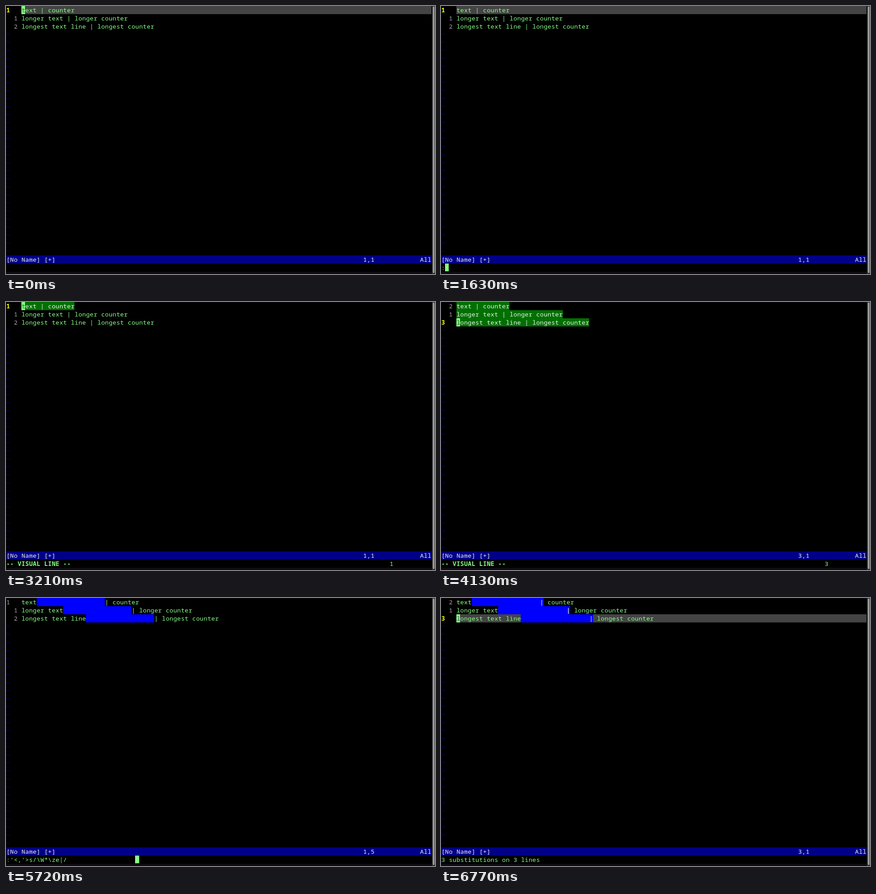
Animation, 947 px wide and 592 px high, one loop 8 s. Source, as an HTML page with a canvas:

```html
<!DOCTYPE html>
<html lang="en">
<head>
<meta charset="utf-8">
<style>
  html, body { margin: 0; width: 100%; height: 100%; overflow: hidden; background: #000; }
  canvas { display: block; }
</style>
</head>
<body>
<canvas id="stage" width="947" height="592"></canvas>
<script>
const ctx = document.getElementById('stage').getContext('2d');
const LOOP = 8000, COLS = 112, GUTTER = 4, STATUS = 31, COMMAND = 32;
const GREEN = '#87ff87', WHITE = '#f0f0f0', GRAY = '#a8a8a8', YELLOW = '#ffff00';
const CURSOR_LINE = '#444444', VISUAL = '#007000', MATCH = '#0000ff', NAVY = '#000087';

const pairs = [['text', 'counter'], ['longer text', 'longer counter'],
               ['longest text line', 'longest counter']];
const gap = ' '.repeat(18);

// Each state: start time, current line, ruler, and what the editor shows.
const range = ":'<,'>";
const normal = { line: 0, pos: '1,1', cursorLine: true };
const visual = { pos: '3,1', line: 2, selected: 3 };
const states = [
  { at: 0, ...normal },
  { at: 180, ...normal, command: ':' },
  { at: 2930, ...normal },
  { at: 3210, line: 0, pos: '1,1', selected: 1, mode: true },
  { at: 3460, ...visual, mode: true },
  { at: 4160, ...visual, command: range },
  { at: 4370, ...visual, command: range + 's' },
  { at: 4750, line: 0, pos: '1,5', preview: true, padded: true, match: 18,
    command: range + 's/\\W*\\ze|/' + gap },
  { at: 5750, line: 2, pos: '3,1', cursorLine: true, padded: true, match: 19,
    message: '3 substitutions on 3 lines' },
];

const cellX = col => 0.5 + col * 8.38;
const cellY = row => 0.4 + row * 17.76;

function fill(row, col, count, color) {
  const x = Math.round(cellX(col)), y = Math.round(cellY(row));
  ctx.fillStyle = color;
  ctx.fillRect(x, y, Math.round(cellX(col + count)) - x, Math.round(cellY(row + 1)) - y);
}

function put(row, col, text, color, bold) {
  ctx.font = `${bold ? 'bold ' : ''}13.4px "Noto Sans Mono", monospace`;
  ctx.fillStyle = color;
  [...text].forEach((ch, i) => ctx.fillText(ch, cellX(col + i + 0.5), cellY(row) + 13.8));
}

function cursor(row, col, ch = '', color = '#000') {
  fill(row, col, 1, GREEN);
  put(row, col, ch, color);
}

function drawLine(s, row) {
  const [left, right] = pairs[row];
  const text = left + (s.padded ? gap : ' ') + '| ' + right;
  const current = row === s.line, selected = row < s.selected;
  const distance = Math.abs(row - s.line);

  if (current) put(row, 0, String(row + 1), s.preview ? GRAY : YELLOW, !s.preview);
  else put(row, 2, String(distance), GRAY);

  const lit = current && s.cursorLine;
  if (lit) fill(row, GUTTER, COLS - GUTTER, CURSOR_LINE);
  if (selected) {
    const skip = current ? 1 : 0;
    fill(row, GUTTER + skip, text.length - skip, VISUAL);
  }
  if (s.match) fill(row, GUTTER + left.length, s.match, MATCH);
  put(row, GUTTER, text, selected ? WHITE : GREEN);
  if (s.match === 19) put(row, GUTTER + left.length + 18, '|', WHITE);
  if (current && !s.command) cursor(row, GUTTER, text[0], lit ? CURSOR_LINE : VISUAL);
}

function drawFrame() {
  ctx.fillStyle = '#100a12';
  ctx.fillRect(0, 0, 947, 592);
  ctx.fillStyle = '#000';
  ctx.fillRect(1, 1, 939, 586);
  ctx.fillStyle = '#2a2a2a';
  ctx.fillRect(940, 0, 7, 592);
  ctx.fillStyle = '#9a9a9a';
  ctx.beginPath();
  ctx.roundRect(942, 1, 4, 589, 2);
  ctx.fill();
}

function draw(s) {
  drawFrame();
  ctx.textAlign = 'center';
  pairs.forEach((_, row) => drawLine(s, row));
  for (let row = pairs.length; row < STATUS; row++) put(row, 0, '~', '#0000b4');

  fill(STATUS, 0, COLS, NAVY);
  put(STATUS, 0, '[No Name] [+]', WHITE);
  put(STATUS, 94, s.pos, WHITE);
  put(STATUS, 109, 'All', WHITE);

  if (s.mode) {
    put(COMMAND, 0, '-- VISUAL LINE --', GREEN, true);
    put(COMMAND, 101, String(s.selected), GREEN);
  }
  put(COMMAND, 0, s.command || s.message || '', GREEN);
  if (s.command) cursor(COMMAND, s.command.length);
}

function tick() {
  const time = performance.now() % LOOP;
  draw(states.findLast(s => s.at <= time));
  requestAnimationFrame(tick);
}
tick();
</script>
</body>
</html>
```
